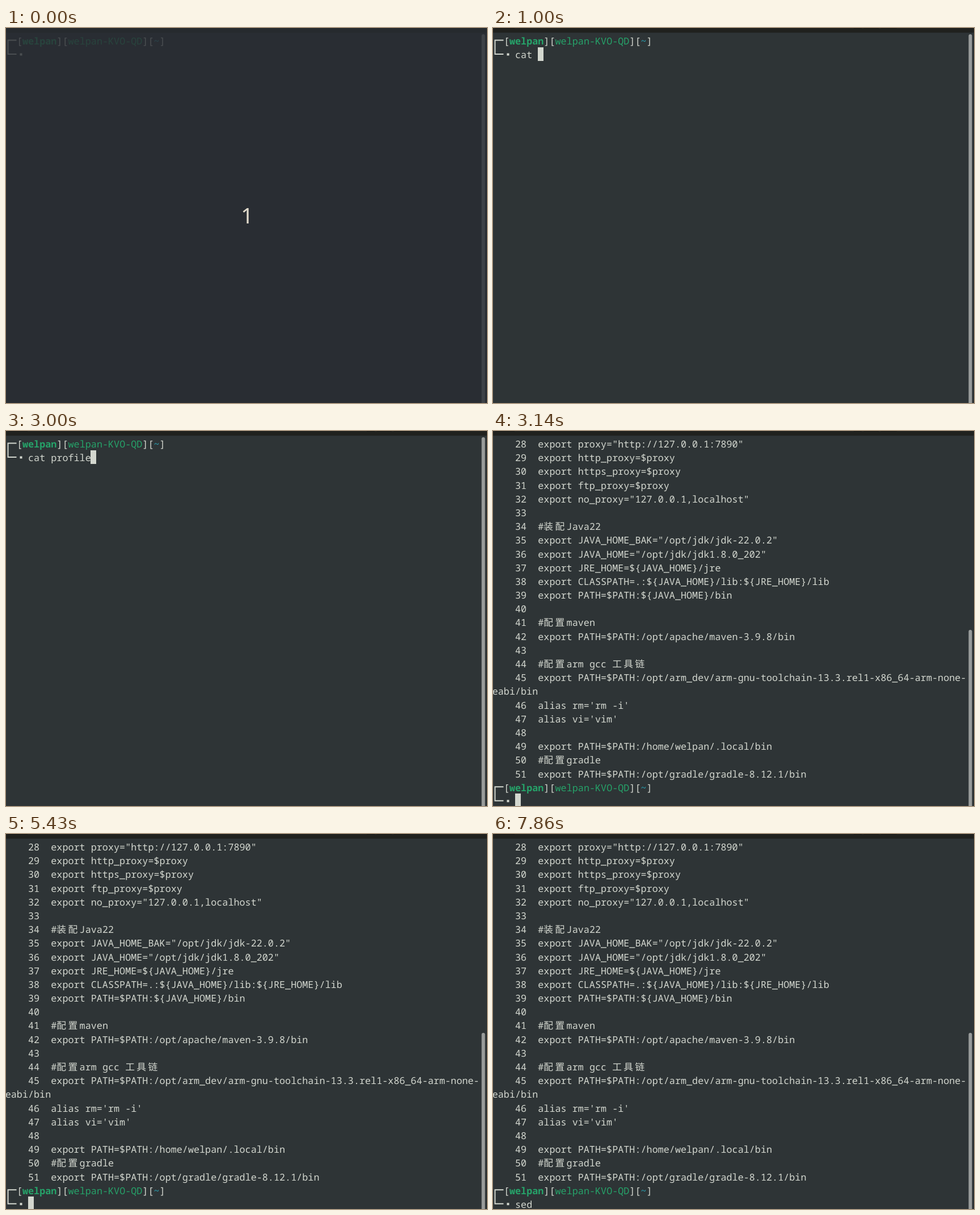
Recreate the animation shown at these times as an HTML page. Size 848x660 px, loop 8000 ms.

```html
<!DOCTYPE html>
<html lang="en">
<head>
<meta charset="utf-8">
<title>Terminal</title>
<style>
  html, body { margin: 0; width: 100%; height: 100%; overflow: hidden; background: #2e3436; }
  svg { display: block; width: 848px; height: 660px; }
  text {
    font: 16.8px "Noto Sans Mono", "DejaVu Sans Mono", monospace;
    fill: #d3d7cf;
    white-space: pre;
    text-rendering: geometricPrecision;
    font-variant-ligatures: none;
  }
  .han { font-family: "Noto Sans CJK SC", "Noto Sans CJK", sans-serif; letter-spacing: .2em; }
  .user { fill: #26a269; font-weight: 600; }
  .host { fill: #26a269; }
  .dir { fill: #2aa1b3; }
  .count { font: 500 37.8px "Noto Sans", "Open Sans", sans-serif; fill: #e2dccd; }
</style>
</head>
<body>
<svg viewBox="0 0 848 660">
  <rect width="848" height="660" fill="#2e3436"/>
  <g id="output"></g>
  <g id="prompt">
    <path d="M18.5 21.5H3.5V46H18.5" fill="none" stroke="#d3d7cf" stroke-width="2"/>
    <rect x="24.5" y="44.5" width="4" height="4" fill="#d3d7cf"/>
    <text x="18.9" y="29">[<tspan class="user">welpan</tspan>][<tspan class="host">welpan-KVO-QD</tspan>][<tspan class="dir">~</tspan>]</text>
    <text id="command" x="39" y="53.2"></text>
  </g>
  <rect id="cursor" width="10" height="24" fill="#d3d7cf"/>
  <rect id="thumb" x="838.5" width="6" rx="3" fill="#999c9b"/>
  <rect x="847" y="8" width="1" height="652" fill="#252a2b"/>
  <rect width="848" height="8" fill="#20211e"/>
  <path d="M4 .5H38M636 .5H650M654 .5H680M684 .5H712" stroke="#161715"/>
  <rect y="8" width="848" height="1" fill="#292e2f"/>
  <g id="overlay">
    <rect width="848" height="660" fill="#282c32" opacity=".8"/>
    <text class="count" x="414.3" y="344">1</text>
  </g>
</svg>
<script>
const LOOP = 8000, CELL = 10.08, ROW = 24.19, LEFT = -1.3;
const OUTPUT_AT = 3140, OVERLAY_END = 140, PROMPT_ROW = 25;
const $ = id => document.getElementById(id);

const FIRST_LINE = 28;
const listing = `export proxy="http://127.0.0.1:7890"
export http_proxy=$proxy
export https_proxy=$proxy
export ftp_proxy=$proxy
export no_proxy="127.0.0.1,localhost"

#装配Java22
export JAVA_HOME_BAK="/opt/jdk/jdk-22.0.2"
export JAVA_HOME="/opt/jdk/jdk1.8.0_202"
export JRE_HOME=\${JAVA_HOME}/jre
export CLASSPATH=.:\${JAVA_HOME}/lib:\${JRE_HOME}/lib
export PATH=$PATH:\${JAVA_HOME}/bin

#配置maven
export PATH=$PATH:/opt/apache/maven-3.9.8/bin

#配置arm gcc 工具链
export PATH=$PATH:/opt/arm_dev/arm-gnu-toolchain-13.3.rel1-x86_64-arm-none-eabi/bin
alias rm='rm -i'
alias vi='vim'

export PATH=$PATH:/home/welpan/.local/bin
#配置gradle
export PATH=$PATH:/opt/gradle/gradle-8.12.1/bin`;

// Each step: start time, typed text, cursor shown
const steps = [
  [0, "", false], [140, "", true],
  [570, "ca", true], [710, "cat", true], [1000, "cat ", true],
  [1290, "cat p", true], [1430, "cat pro", true], [1860, "cat profi", true],
  [2000, "cat profile", true], [2430, "cat profile ", true], [3000, "cat profile", true],
  [3140, "", true], [3710, "", false], [4290, "", true], [4860, "", false], [5430, "", true],
  [5570, "se", true], [5860, "sed", true], [6290, "sed ", true],
  [6710, "sed ", false], [7430, "sed ", true], [7860, "sed ", false]
];

function make(name, parent, attrs, content = "") {
  const node = document.createElementNS("http://www.w3.org/2000/svg", name);
  for (const key in attrs) node.setAttribute(key, attrs[key]);
  node.textContent = content;
  return parent.appendChild(node);
}

// Chinese runs take two cells per character
function addRow(row, content) {
  const line = make("text", $("output"), { x: LEFT, y: 29 + row * ROW });
  for (const run of content.split(/(\p{Script=Han}+)/u)) {
    if (run) make("tspan", line, /\p{Script=Han}/u.test(run) ? { class: "han" } : {}, run);
  }
}

function buildOutput() {
  const columns = 83;
  let row = 0;
  listing.split("\n").forEach((source, i) => {
    const line = `    ${FIRST_LINE + i}  ${source}`;
    for (let at = 0; at < line.length; at += columns) addRow(row++, line.slice(at, at + columns));
  });
}

function show(node, visible) {
  node.setAttribute("visibility", visible ? "visible" : "hidden");
}

function draw(time) {
  const [, typed, cursorOn] = steps.findLast(([start]) => start <= time);
  const printed = time >= OUTPUT_AT;
  const row = printed ? PROMPT_ROW : 0;
  const thumbTop = printed ? 350 : 11;

  show($("output"), printed);
  show($("overlay"), time < OVERLAY_END);
  show($("cursor"), cursorOn);
  $("prompt").setAttribute("transform", `translate(0 ${row * ROW})`);
  $("command").textContent = typed;
  $("cursor").setAttribute("x", Math.floor(LEFT + (4 + typed.length) * CELL));
  $("cursor").setAttribute("y", Math.floor(10 + (row + 1) * ROW));
  $("thumb").setAttribute("y", thumbTop);
  $("thumb").setAttribute("height", 664 - thumbTop);
}

function tick() {
  draw(performance.now() % LOOP);
  requestAnimationFrame(tick);
}

buildOutput();
tick();
</script>
</body>
</html>
```
